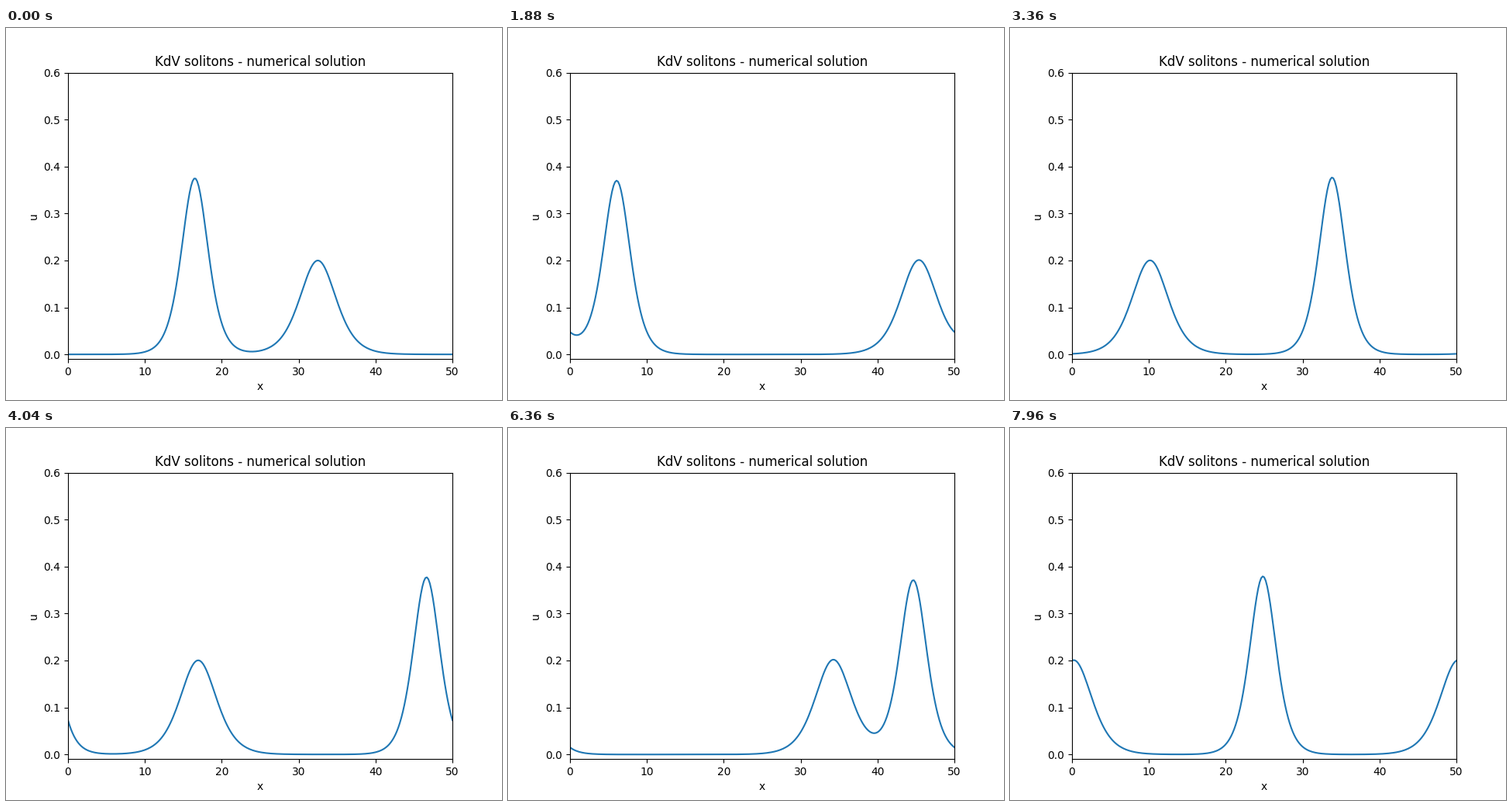
A matplotlib script that plays this animation: 640x480 px, repeating every 8000 ms.

```python
import numpy as np
import matplotlib.pyplot as plt
from matplotlib.animation import FuncAnimation

LENGTH = 50.0
MODES = 128          # grid points of the solver
POINTS = 256         # points of the drawn curve
FRAMES = 200
INTERVAL = 40
STEPS = 50           # solver steps per unit of time
GROWTH = 0.0018      # slow amplitude growth of a first-order time step
DRIFT = 0.001        # slight phase lag of the scheme


def soliton(x, c):
    """Single travelling wave of speed c, centred on x = 0."""
    return 0.5 * c / np.cosh(0.5 * np.sqrt(c) * x) ** 2


def solve():
    """Integrate u_t = -6 u u_x - u_xxx on a periodic domain, one row per frame."""
    x = np.arange(MODES) * LENGTH / MODES
    k = 2 * np.pi * np.arange(MODES // 2 + 1) / LENGTH
    h = 1.0 / STEPS
    half = np.exp(0.5j * h * (k ** 3 + DRIFT * k))
    full = half ** 2

    def rhs(v):
        u = np.fft.irfft(v, MODES)
        u2 = u * u
        return -3j * k * np.fft.rfft(u2) + GROWTH * k ** 2 * np.fft.rfft(u2 * u)

    def step(v):
        # fourth-order Runge-Kutta with the linear part solved exactly
        a = h * rhs(v)
        b = h * rhs(half * (v + a / 2))
        c = h * rhs(half * v + b / 2)
        d = h * rhs(full * v + half * c)
        return full * v + (full * a + 2 * half * (b + c) + d) / 6

    v = np.fft.rfft(soliton(x - 0.33 * LENGTH, 0.75)
                    + soliton(x - 0.65 * LENGTH, 0.4))
    rows = []
    for _ in range(FRAMES):
        u = np.fft.irfft(v, POINTS) * POINTS / MODES
        rows.append(np.append(u, u[0]))
        for _ in range(STEPS):
            v = step(v)
    return np.array(rows)


waves = solve()

fig, ax = plt.subplots(figsize=(6.4, 4.8), dpi=100)
ax.set_xlim(0, LENGTH)
ax.set_ylim(-0.01, 0.6)
ax.set_xlabel("x")
ax.set_ylabel("u")
ax.set_title("KdV solitons - numerical solution")
line, = ax.plot(np.linspace(0, LENGTH, POINTS + 1), waves[0], color="C0", lw=1.5)


def update(i):
    line.set_ydata(waves[i])
    return line,


anim = FuncAnimation(fig, update, frames=FRAMES, interval=INTERVAL,
                     repeat=True, repeat_delay=0)
plt.show()
```
